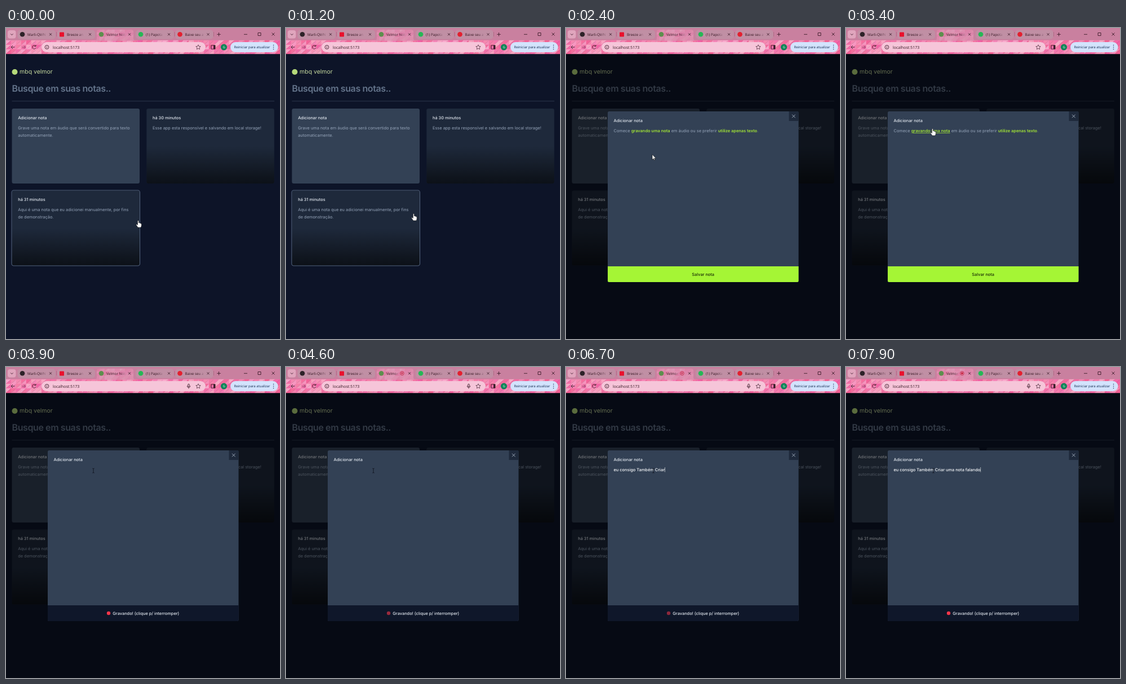
An HTML page for the animation above (8000 ms loop, 486 px wide and 552 px high).

```html
<!DOCTYPE html>
<html lang="pt">
<head>
<meta charset="utf-8">
<style>
  html, body { margin: 0; width: 100%; height: 100%; overflow: hidden; background: #0d1428; }
  svg { display: block; width: 100%; height: 100%; }
  text { font: 400 7.4px Inter, sans-serif; white-space: pre; text-rendering: geometricPrecision; }
  .m { font-weight: 500; }
  .b { font-weight: 600; fill: #a3e635; }
  .ui { font: 6.3px "Open Sans", sans-serif; }
  .line { fill: none; stroke: #3b1c2a; stroke-width: .9; }
</style>
</head>
<body>
<svg viewBox="0 0 486 552" id="stage">
  <defs>
    <linearGradient id="shade" x2="0" y2="1">
      <stop offset=".5" stop-color="#000" stop-opacity="0"/>
      <stop offset="1" stop-color="#000" stop-opacity=".6"/>
    </linearGradient>
    <linearGradient id="fade">
      <stop offset=".7" stop-color="#33141f"/>
      <stop offset="1" stop-color="#33141f" stop-opacity=".15"/>
    </linearGradient>
    <clipPath id="active"><path d="M157 22.500q4 0 4-4V7q0-4 4-4H222q4 0 4 4V18.500q0 4 4 4z"/></clipPath>
  </defs>

  <g id="page">
    <circle cx="15.500" cy="78" r="5" fill="#b5d97a"/>
    <text x="24" y="81" style="font-size:10.500px" fill="#c8dca0">mbq velmor</text>
    <text x="10.500" y="113" style="font-size:16px;font-weight:600;letter-spacing:-.025em" fill="#64748b">Busque em suas notas..</text>
    <path d="M10.500 129.800H476" stroke="#334155" stroke-width=".8"/>
    <g id="cards"></g>
  </g>

  <g id="modal">
    <rect y="46" width="486" height="506" opacity=".5"/>
    <rect x="74" y="148" width="338.500" height="303" rx="2.500" fill="#334155"/>
    <path d="M395.500 148H410a2.500 2.500 0 0 1 2.500 2.500V165H395.500z" fill="#1e293b"/>
    <path d="M401 153.700l5.600 5.600m0-5.600l-5.600 5.600" stroke="#a9b5c6" stroke-width=".9"/>
    <text class="m" x="84.500" y="166.700" fill="#e2e8f0">Adicionar nota</text>
    <g id="intro">
      <text x="84.500" y="185" fill="#94a3b8">Comece <tspan id="link" class="b">gravando uma nota</tspan> em áudio ou se preferir <tspan class="b">utilize apenas texto</tspan>.</text>
      <path d="M74 423H412.500V448.500a2.500 2.500 0 0 1-2.500 2.500H76.500a2.500 2.500 0 0 1-2.500-2.500z" fill="#a5f535"/>
      <text class="m" x="243.200" y="439.700" text-anchor="middle" fill="#1a2e05">Salvar nota</text>
    </g>
    <g id="rec">
      <path d="M74 423H412.500V448.500a2.500 2.500 0 0 1-2.500 2.500H76.500a2.500 2.500 0 0 1-2.500-2.500z" fill="#0f172a"/>
      <circle id="dot" cx="182" cy="437" r="3.200" fill="#f5364a"/>
      <text class="m" x="189.300" y="439.700" fill="#e2e8f0">Gravando! (clique p/ interromper)</text>
      <text id="speech" class="m" x="84.500" y="185" fill="#f8fafc"></text>
      <path id="caret" stroke="#f8fafc" stroke-width=".6"/>
    </g>
  </g>

  <g id="browser">
    <rect width="486" height="23" fill="#c9809f"/>
    <g id="pattern"></g>
    <g clip-path="url(#active)">
      <rect x="157" width="73" height="23" fill="#cf8fab"/>
      <g id="tabPattern" opacity=".35"></g>
    </g>
    <rect x="3" y="4" width="14.500" height="14.500" rx="4" fill="#e0a5bd"/>
    <path class="line" d="M8.200 10.300l2.200 2.200 2.200-2.200M377.500 8v6.500M374.200 11.300h6.600M422 11.300h6M447 8.500h5v5h-5zM471.500 8.500l5 5m0-5l-5 5"/>
    <g id="tabs"></g>
    <path d="M89.500 7v8M299 7v8M368.500 7v8" stroke="#a2607c" stroke-width=".7"/>
    <g id="tabRec">
      <circle cx="206" cy="11.300" r="3.300" fill="none" stroke="#c62139" stroke-width=".8"/>
      <circle id="tabDot" cx="206" cy="11.300" r="1.800" fill="#c62139"/>
    </g>
    <path class="line" d="M15.500 34H9m3-3l-3 3 3 3M52.500 32a3.200 3.200 0 1 0 .5 3M53 30v2.500h-2.500"/>
    <path class="line" opacity=".5" d="M28 34h6.500m-3-3l3 3-3 3"/>
    <rect x="63" y="25" width="291" height="18" rx="9" fill="#f6c5d9"/>
    <circle class="line" cx="72.500" cy="34" r="3.400"/>
    <path class="line" d="M72.500 33.500v2.300M72.500 31.900v.8"/>
    <text class="ui" x="83" y="36.500" style="font-size:7px" fill="#33141f">localhost:5173</text>
    <path id="mic" class="line" d="M322.700 31.500a1.300 1.300 0 0 1 2.600 0v2a1.300 1.300 0 0 1-2.600 0zM321.200 33.500a2.800 2.800 0 0 0 5.600 0M324 36.300v2"/>
    <path class="line" style="stroke-width:.7" d="M341 29.800l1.200 2.700 3 .3-2.200 2 .6 3-2.600-1.500-2.600 1.500.6-3-2.200-2 3-.3z"/>
    <path class="line" d="M364 30.700h7v6.600h-7z"/>
    <path d="M368 30.700h3v6.600h-3z" fill="#3b1c2a"/>
    <circle cx="386.500" cy="34" r="5.500" fill="#0b8457"/>
    <text class="ui" x="386.500" y="36.100" text-anchor="middle" style="font-size:5.800px" fill="#fff">G</text>
    <rect x="398" y="25" width="84.500" height="18" rx="9" fill="#d3e3fd"/>
    <text class="ui" x="404.500" y="36.200" style="font-size:6px" fill="#122a50">Reiniciar para atualizar</text>
    <path d="M474.500 30.500v.01m0 3.500v.01m0 3.500v.01" stroke="#122a50" stroke-width="1.500" stroke-linecap="round"/>
  </g>

  <g id="cursor">
    <path id="arrow" d="M0 0V9.200L2.200 7.200 3.600 10.300 5 9.700 3.600 6.700H6.500z" fill="#fff" stroke="#000" stroke-width=".6"/>
    <path id="hand" d="M-1 1Q0-.7 1 1V4.300Q2.200 3.700 2.800 4.800Q4 4.300 4.500 5.500Q5.800 5.300 5.800 6.700V9.300Q5.500 11 4.700 12.500H-.5Q-2 10.300-3.600 8Q-3.700 6.300-2.300 7L-1 8.200z" fill="#fff" stroke="#111" stroke-width=".6"/>
    <path id="beam" d="M-1.700-4Q0-4 0-3V3Q0 4-1.700 4M1.700-4Q0-4 0-3M0 3Q0 4 1.700 4" fill="none" stroke="#0b0f18" stroke-width=".8"/>
  </g>
</svg>
<script>
const $ = id => document.getElementById(id);
const show = (id, on) => $(id).style.display = on ? "" : "none";

// Pink facets behind the toolbar and in the active tab
let seed = 7;
const rnd = () => (seed = seed * 16807 % 2147483647) / 2147483647;
function facets(x0, y0, x1, y1) {
  let s = "";
  for (let y = y0; y < y1; y += 8)
    for (let x = x0; x < x1; x += 9)
      for (const pts of [[x, y, x + 9, y, x, y + 8], [x + 9, y, x + 9, y + 8, x, y + 8]]) {
        const c = `hsl(${332 + rnd() * 8} 85% ${66 + rnd() * 16}%)`;
        s += `<polygon points="${pts}" fill="${c}" stroke="${c}" stroke-width=".4"/>`;
      }
  return s;
}
$("pattern").innerHTML = facets(0, 22, 486, 46);
$("tabPattern").innerHTML = facets(157, 0, 230, 23);

const tabs = [
  [29, "#2c2228", "Marli-QV/N"], [99, "#e8112d", "Breeze an", 1], [169, "#5d8f4d", "Velmor Not"],
  [239, "#25b855", "(1) Papota"], [308.500, "#e3202f", "Baixe seu a"]
];
$("tabs").innerHTML = tabs.map(([x, color, title, square], i) =>
  (i === 2 ? "" : `<rect x="${x - 8.500}" y="3.500" width="67.500" height="16" rx="5" fill="#c08fa4"/>`) +
  (square ? `<rect x="${x - 4}" y="7.500" width="8" height="8" rx="1" fill="${color}"/>`
          : `<circle cx="${x}" cy="11.300" r="4.300" fill="${color}"/>`) +
  `<text class="ui" id="tab${i}" x="${x + 9}" y="13.600" fill="url(#fade)">${title}</text>
   <path class="line" d="M${x + 48} 9.300l4 4m0-4l-4 4"/>`).join("");

const cards = [
  [10.500, 143, "Adicionar nota", ["Grave uma nota em áudio que será convertido para texto", "automaticamente."]],
  [249.300, 143, "há 30 minutos", ["Esse app esta responsível e salvando em local storage!"]],
  [10.500, 288.500, "há 31 minutos", ["Aqui é uma nota que eu adicionei manualmente, por fins", "de demonstração."]]
];
$("cards").innerHTML = cards.map(([x, y, title, lines], i) => {
  const box = `x="${x}" y="${y}" width="226.500" height="133" rx="3.200"`;
  return `<rect ${box} fill="${i ? "#1e293b" : "#334155"}"/>` +
    (i ? `<rect ${box} fill="url(#shade)"/>` : "") +
    `<rect id="ring${i}" x="${x - .5}" y="${y - .5}" width="227.500" height="134" rx="3.700" fill="none" stroke="#506079" stroke-width="1.100"/>
     <text class="m" x="${x + 10.700}" y="${y + 18.700}" fill="#e2e8f0">${title}</text>` +
    lines.map((s, n) => `<text x="${x + 10.700}" y="${y + 36.800 + n * 12.800}" fill="#94a3b8">${s}</text>`).join("");
}).join("");

const OPEN = 2400, RECORD = 3900;
// [time, x, y] of the pointer tip
const path = [[0, 234.500, 341.500], [1100, 234.500, 341.500], [1600, 156, 225], [2300, 156, 225],
  [2400, 153, 224.500], [2800, 153, 224.500], [3400, 153.500, 178.500], [3800, 153.500, 178.500],
  [3900, 155, 184], [8000, 155, 184]];
const words = [[5000, "eu"], [5500, " consigo"], [6100, " Também"], [6500, " Criar"],
  [7000, " uma"], [7200, " nota"], [7700, " falando"]];
const ease = p => p * p * (3 - 2 * p);

function pointer(t) {
  const i = path.findIndex((k, n) => n && t < k[0]);
  const [t0, x0, y0] = path[i - 1], [t1, x1, y1] = path[i];
  const p = ease((t - t0) / (t1 - t0));
  return [x0 + (x1 - x0) * p, y0 + (y1 - y0) * p];
}

let spoken;
function draw(now) {
  const t = Math.floor(now % 8000 / 100) * 100;
  const open = t >= OPEN, rec = t >= RECORD;
  const [x, y] = pointer(t);
  const over = open ? -1 : y > 288 ? 2 : y < 276 ? 0 : -1;
  const link = open && !rec && y < 187;

  cards.forEach((c, i) => show("ring" + i, i === over));
  show("modal", open);
  show("intro", !rec);
  show("rec", rec);
  show("mic", rec);
  show("tabRec", t >= 4100);
  $("tab2").textContent = t >= 4100 ? "Velmor" : "Velmor Not";
  $("link").style.textDecoration = link ? "underline" : "none";

  const pulse = .75 + .25 * Math.cos((t - RECORD) / 1000 * Math.PI);
  $("dot").style.opacity = pulse;
  $("tabDot").style.opacity = pulse;

  const said = words.filter(w => t >= w[0]).map(w => w[1]).join("");
  if (said !== spoken) {
    $("speech").textContent = spoken = said;
    const end = 84.900 + $("speech").getComputedTextLength();
    $("caret").setAttribute("d", said ? `M${end} 178v8.500` : "");
  }

  const hand = over >= 0 || link;
  show("hand", hand);
  show("beam", rec);
  show("arrow", !hand && !rec);
  $("cursor").setAttribute("transform", `translate(${x} ${y})`);
}

const start = performance.now();
function loop() {
  draw(performance.now() - start);
  requestAnimationFrame(loop);
}
loop();
</script>
</body>
</html>
```
